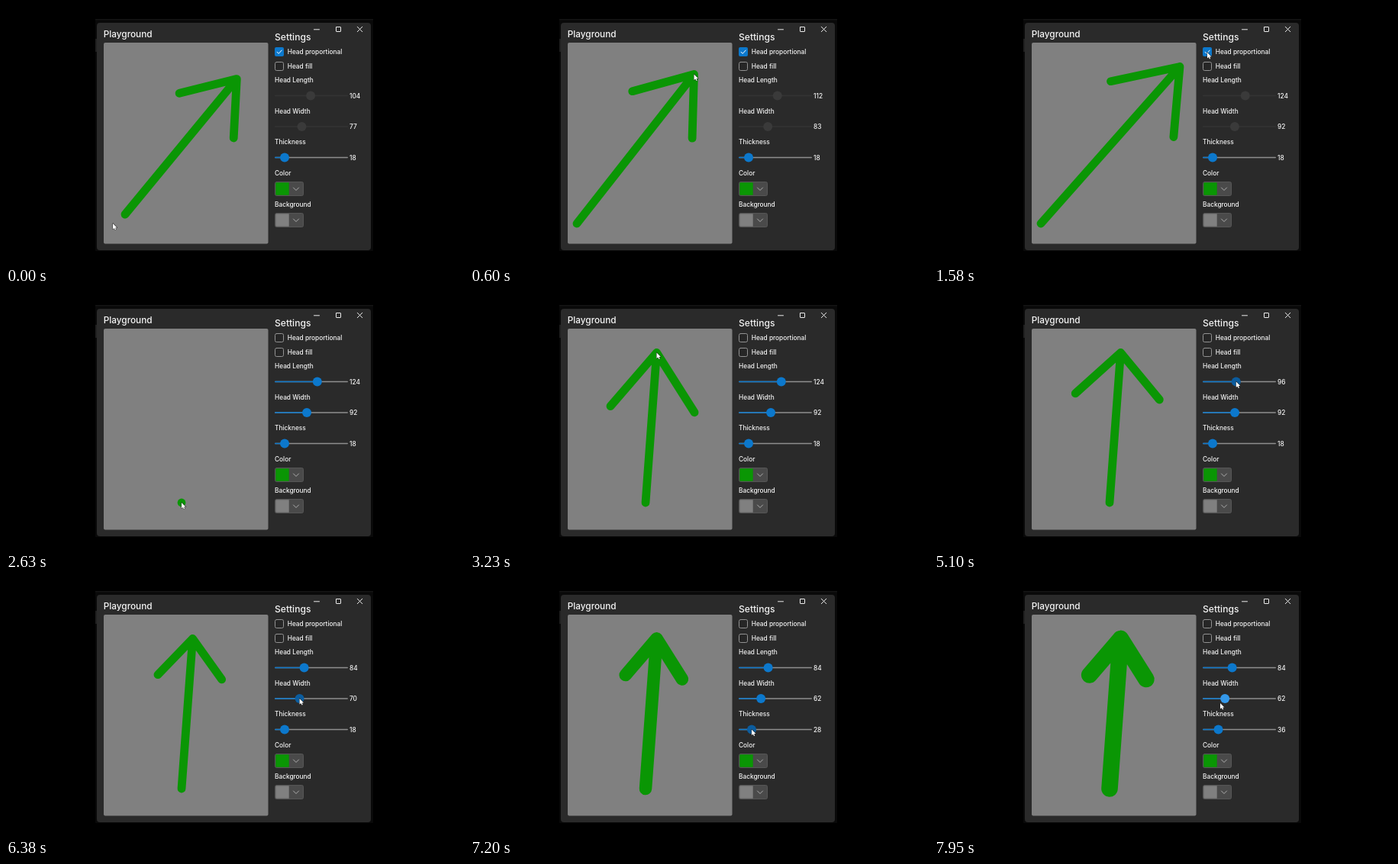
An HTML page with a canvas for the animation above (8 s loop, 600 by 338 pixels).

```html
<!DOCTYPE html>
<html lang="en">
<head>
<meta charset="utf-8">
<title>Arrow playground</title>
<style>
html, body { margin: 0; width: 100%; height: 100%; overflow: hidden; background: #000; }
canvas { display: block; width: 600px; height: 338px; }
</style>
</head>
<body>
<canvas width="600" height="338"></canvas>
<script>
const ctx = document.querySelector('canvas').getContext('2d');
const LOOP = 8000, STEP = 75, UNIT = 0.6;
const GREEN = '#0a9604', GRAY = '#808080', BLUE = '#0c78cc', TEXT = '#f4f4f4';
const PANEL = 352, SLIDER_TOP = 117.5, SLIDER_GAP = 40.5;

const mix = (a, b, p) => a + (b - a) * p;
const mixPoint = (a, b, p) => a.map((v, i) => mix(v, b[i], p));
const ramp = (t, from, to) => Math.min(1, Math.max(0, (t - from) / (to - from)));
const ease = p => p * p * (3 - 2 * p);
const distance = (a, b) => Math.hypot(b[0] - a[0], b[1] - a[1]);

// What the pointer holds and when; between two stops it glides from one to the next.
const stops = [
  { from: 0, to: 180, spot: () => [140, 285] },
  { from: 450, to: 1125, spot: s => s.tip },
  { from: 1450, to: 1700, spot: () => [358, 61] },
  { from: 2600, to: 3225, spot: s => s.tip },
  { from: 4200, to: 5486, spot: s => thumb(s, 0), slider: 0 },
  { from: 6000, to: 6511, spot: s => thumb(s, 1), slider: 1 },
  { from: 6975, to: 7400, spot: s => thumb(s, 2), slider: 2 },
  { from: 7800, to: LOOP, spot: () => [375, 164] }
];
const [, firstDrag, uncheck, secondDrag, lengthDrag, widthDrag, thicknessDrag] = stops;
const during = (t, stop) => ramp(t, stop.from, stop.to);

function stateAt(t) {
  const redrawn = t >= secondDrag.from;
  const proportional = t < uncheck.to;
  let tail = mixPoint([156, 273], [140, 285], ramp(t, 0, 150));
  let tip = mixPoint([302.3, 95.6], [293.5, 89.5], ramp(t, firstDrag.from, 600));
  tip = mixPoint(tip, [322, 79.5], ease(ramp(t, 600, firstDrag.to)));
  if (redrawn) {
    tail = [230, 276];
    tip = mixPoint(tail, [244.5, 79.5], ease(ramp(t, 2630, secondDrag.to)));
  }
  const span = distance(tail, tip);
  const values = [
    proportional ? span * 0.4515 : mix(124, 84, during(t, lengthDrag)),
    proportional ? span * 0.334 : mix(92, 62, during(t, widthDrag)),
    mix(18, 36, during(t, thicknessDrag))
  ];
  return { tail, tip, values, proportional };
}

function thumb(state, index) {
  const value = state.values[index];
  const x = index === 2 ? 357.5 + 0.417 * value : 354.5 + 0.43 * value;
  return [x, SLIDER_TOP + index * SLIDER_GAP];
}

function pointerAt(t) {
  const next = stops.find(stop => t <= stop.to);
  const spotAt = (stop, time) => stop.spot(stateAt(time));
  if (t >= next.from) return spotAt(next, t);
  const previous = stops[stops.indexOf(next) - 1];
  return mixPoint(spotAt(previous, previous.to), spotAt(next, next.from),
    ease(ramp(t, previous.to, next.from)));
}

function box(x, y, w, h, r, fill, stroke) {
  ctx.beginPath();
  ctx.roundRect(x, y, w, h, r);
  if (fill) { ctx.fillStyle = fill; ctx.fill(); }
  if (stroke) { ctx.strokeStyle = stroke; ctx.lineWidth = 1; ctx.stroke(); }
}

function lines(color, width, ...paths) {
  ctx.strokeStyle = color;
  ctx.lineWidth = width;
  ctx.beginPath();
  for (const path of paths) path.forEach((p, i) => i ? ctx.lineTo(...p) : ctx.moveTo(...p));
  ctx.stroke();
}

function label(text, x, y, size = 8.3) {
  ctx.font = `500 ${size}px Inter, sans-serif`;
  ctx.fillStyle = TEXT;
  ctx.fillText(text, x, y);
}

function chevron(x, y, w, h, color) {
  lines(color, 0.9, [[x - w, y - h], [x, y], [x + w, y - h]]);
}

function checkbox(text, y, checked) {
  if (checked) {
    box(PANEL, y, 12, 12, 2, BLUE);
    lines('#fff', 1, [[355, y + 6.2], [357.2, y + 8.4], [361.2, y + 4]]);
  } else {
    box(PANEL + 0.5, y + 0.5, 11, 11, 2, '#262626', '#939393');
  }
  label(text, 368.7, y + 9);
}

function slider(text, value, [x, y], enabled, color) {
  label(text, PANEL, y - 17.3);
  box(PANEL, y - 0.8, 96, 1.6, 0.8, enabled ? '#8e8e8e' : '#343434');
  if (enabled) box(PANEL, y - 0.8, x - PANEL, 1.6, 0.8, BLUE);
  box(x - 6, y - 6, 12, 12, 6, enabled ? color : '#3a3a3a');
  label(Math.round(value), 450, y + 3.2);
}

function picker(text, y, color) {
  label(text, PANEL, y - 8.5);
  box(PANEL + 0.5, y + 0.5, 37, 18, 2, '#4a4a4a', '#565656');
  box(PANEL + 1.3, y + 1.3, 17.4, 16.4, [1, 0, 0, 1], color);
  chevron(380, y + 11.5, 3.5, 3.5, '#b8b8b8');
}

function drawWindow() {
  box(0, 0, 600, 338, 0, '#000');
  box(117, 17, 364, 304, 0, '#090909');
  box(117, 17, 364, 1.5, 0, '#141414');
  box(117, 43, 2, 17, 0, '#202020');
  box(119, 22, 359, 298, 4, '#2a2a2a');
  lines('#ececec', 1, [[403.5, 30.8], [410.5, 30.8]],
    [[460.3, 27.2], [466.8, 33.7]], [[466.8, 27.2], [460.3, 33.7]]);
  box(432.5, 27.5, 6, 6, 0.5, null, '#ececec');
  label('Playground', 127.7, 41.3, 11.8);
  label('Settings', PANEL, 44.6, 12.1);
  box(128, 48, 215.5, 263.5, 2, GRAY);
}

function drawArrow(tail, tip, [length, width, thickness]) {
  const span = distance(tail, tip);
  const paths = [[tail, tip]];
  if (span > 1) {
    const ux = (tip[0] - tail[0]) / span, uy = (tip[1] - tail[1]) / span;
    const wing = side => [
      tip[0] - (ux * length + uy * width * side) * UNIT,
      tip[1] - (uy * length - ux * width * side) * UNIT
    ];
    paths.push([wing(1), tip, wing(-1)]);
  }
  lines(GREEN, thickness * UNIT, ...paths);
}

function drawPointer([x, y]) {
  ctx.save();
  ctx.translate(x, y);
  const shape = new Path2D('M0 0V7.6L1.8 6L3 8.6L4.2 8L3.1 5.6L5.4 5.4Z');
  ctx.strokeStyle = '#222';
  ctx.lineWidth = 0.9;
  ctx.stroke(shape);
  ctx.fillStyle = '#fff';
  ctx.fill(shape);
  ctx.restore();
}

function draw(t) {
  const state = stateAt(t), pointer = pointerAt(t);
  const held = stops.find(stop => t >= stop.from && t <= stop.to);

  ctx.lineCap = ctx.lineJoin = 'round';
  drawWindow();
  drawArrow(state.tail, state.tip, state.values);
  checkbox('Head proportional', 54, state.proportional);
  checkbox('Head fill', 73, false);
  ['Head Length', 'Head Width', 'Thickness'].forEach((text, i) => {
    const spot = thumb(state, i);
    const hovered = distance(pointer, spot) < 9;
    const color = held && held.slider === i ? '#0b5c9e' : hovered ? '#3498ea' : BLUE;
    slider(text, state.values[i], spot, i === 2 || !state.proportional, color);
  });
  picker('Color', 230, GREEN);
  picker('Background', 271, GRAY);
  drawPointer(pointer);
}

function frame() {
  const t = performance.now() % LOOP;
  draw(Math.floor((t + 1) / STEP) * STEP);
  requestAnimationFrame(frame);
}
frame();
</script>
</body>
</html>
```
